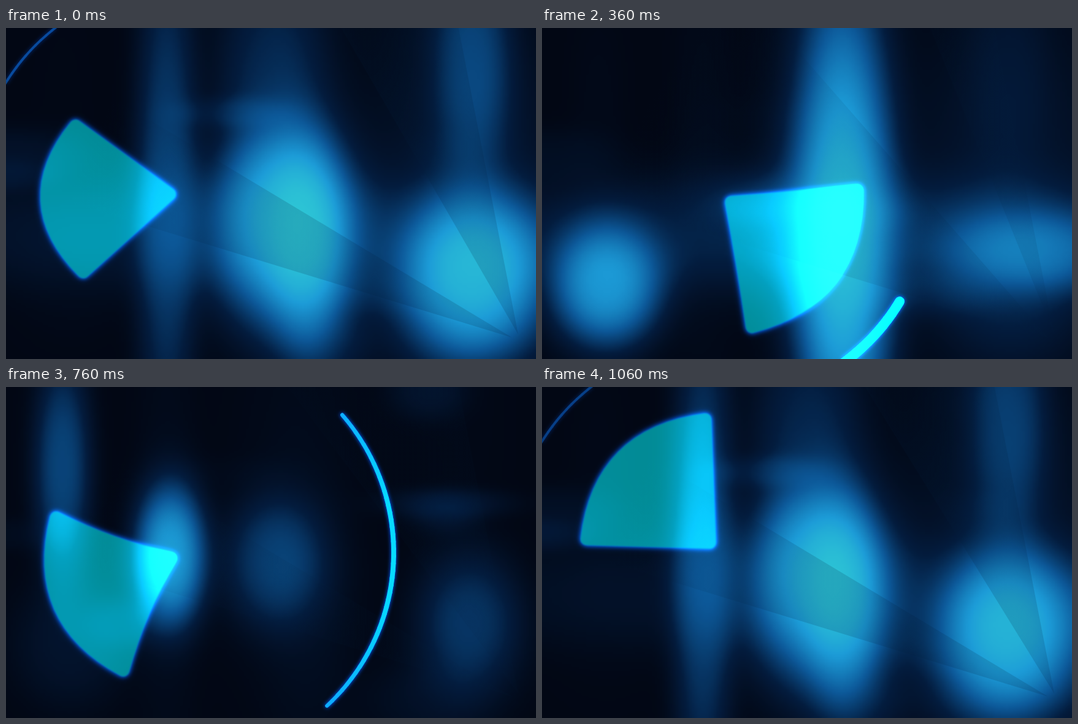
Animation of 864x540 px, one loop 1100 ms. Source, as an HTML page with a canvas:

```html
<!DOCTYPE html>
<html lang="en">
<head>
<meta charset="utf-8">
<title>Glow loop</title>
<style>
html, body { margin: 0; width: 100%; height: 100%; overflow: hidden; background: #02030c; }
canvas { display: block; width: 864px; height: 540px; }
</style>
</head>
<body>
<canvas id="stage" width="864" height="540"></canvas>
<script>
const W = 864, H = 540, CELL = 4, LOOP = 1100, HOLD = 100, BEAT = 500;
const CX = 290, CY = 270, RAD = Math.PI / 180;
const COLS = W / CELL, ROWS = H / CELL;

function makeCanvas(w, h) {
  const c = document.createElement('canvas');
  c.width = w;
  c.height = h;
  return c.getContext('2d');
}
const ctx = document.getElementById('stage').getContext('2d');
const pen = makeCanvas(W, H);
const haze = makeCanvas(COLS, ROWS);
const pixels = haze.createImageData(COLS, ROWS);
const field = new Float32Array(COLS * ROWS);

const clamp = (v, lo = 0, hi = 1) => Math.max(lo, Math.min(hi, v));

// Bell-shaped swell around a moment of the two-beat cycle
function pulse(time, peak, spread = 200) {
  const cycle = 2 * BEAT;
  const away = Math.abs(time - peak) % cycle;
  return Math.exp(-((Math.min(away, cycle - away) / spread) ** 2));
}

// Light level to colour: black, navy, blue, azure, aqua
const ramp = ['2,3,12', '3,28,62', '12,88,152', '28,155,215', '52,215,212'].map(c => c.split(',').map(Number));
const palette = Array.from({ length: 256 }, (_, i) => {
  const p = i / 256 * 4, n = Math.floor(p);
  return ramp[n].map((v, c) => v + (ramp[n + 1][c] - v) * (p - n));
});

const lamps = [];
function lamp(x, y, rx, ry, level, peak) {
  const shape = field.map((_, i) => {
    const dx = ((i % COLS + 0.5) * CELL - x) / rx;
    const dy = ((Math.floor(i / COLS) + 0.5) * CELL - y) / ry;
    return Math.exp(-((dx * dx + dy * dy) ** 1.4));
  });
  lamps.push({ shape, level, peak });
}

// Middle
lamp(455, 335, 125, 170, 0.72, 30);
lamp(490, 345, 62, 160, 0.6, 30);
lamp(490, 330, 85, 420, 0.85, 310);
lamp(440, 285, 85, 110, 0.6, 820);
lamp(430, 90, 90, 200, 0.25, 0);
// Left
lamp(105, 420, 95, 105, 0.97, 380);
lamp(92, 130, 48, 180, 0.42, 610);
lamp(268, 275, 60, 120, 0.75, 680);
lamp(262, 270, 52, 420, 0.36, 960);
// Right
lamp(765, 410, 130, 140, 0.75, 30);
lamp(755, 385, 85, 115, 0.6, 830);
lamp(760, 60, 65, 200, 0.35, 30);
lamp(800, 365, 150, 65, 0.4, 230);
// Wide haze
lamp(430, 335, 700, 95, 0.28, 160);
lamp(760, 250, 180, 300, 0.2, 130);

let seed = 11;
function random() {
  seed = seed * 16807 % 2147483647;
  return seed / 2147483647;
}
for (let i = 0; i < 12; i++) {
  lamp(random() * W, random() * H, 50 + 70 * random(), 25 + 40 * random(), 0.13, 1000 * random());
}

function drawHaze(time) {
  field.fill(0.96);
  for (const { shape, level, peak } of lamps) {
    const power = level * pulse(time, peak);
    if (power < 0.004) continue;
    for (let i = 0; i < field.length; i++) field[i] *= 1 - power * shape[i];
  }
  field.forEach((dark, i) => {
    const [r, g, b] = palette[Math.floor(clamp(1 - dark, 0, 0.999) * 256)];
    pixels.data.set([r, g, b, 255], i * 4);
  });
  haze.putImageData(pixels, 0, 0);
  ctx.imageSmoothingQuality = 'high';
  ctx.drawImage(haze.canvas, 0, 0, W, H);
}

// Shaded fan that fades away from its apex
function beam(x, y, from, to, strength) {
  const reach = 760;
  const fill = ctx.createRadialGradient(x, y, 0, x, y, reach);
  fill.addColorStop(0, `rgba(0,30,60,${strength})`);
  fill.addColorStop(0.6, `rgba(0,30,60,${strength})`);
  fill.addColorStop(1, 'rgba(0,30,60,0)');
  ctx.fillStyle = fill;
  ctx.beginPath();
  ctx.moveTo(x, y);
  ctx.arc(x, y, reach, from * RAD, to * RAD);
  ctx.fill();
}

function drawBeams(time) {
  const turn = Math.PI * time / BEAT;
  const sway = Math.sin(turn);
  const strength = 0.04 + 0.06 * (1 + Math.cos(turn));
  beam(825, 505, 197, 211 + 18 * Math.max(0, sway), strength);
  beam(835, 500, 240 + 8 * sway, 259, strength);
}

// Adds the drawing layer to the stage as light
function addLayer(filter, alpha) {
  ctx.save();
  ctx.globalCompositeOperation = 'lighter';
  ctx.globalAlpha = alpha;
  ctx.filter = filter;
  ctx.drawImage(pen.canvas, 0, 0);
  ctx.restore();
  pen.clearRect(0, 0, W, H);
}

function drawWedge(time) {
  const u = time % BEAT / BEAT;
  const first = time < BEAT;
  const kick = Math.exp(-7 * u);
  const angle = first ? 403 - 226 * kick : 225 - 182 * (1 - u) ** 2.4;
  const squeeze = first ? kick : 0;
  const swell = 9 * pulse(time, 200);
  const bend = 18 * pulse(time, 560);
  const half = (39 - 4 * squeeze) * RAD;
  const r = 216 - 11 * squeeze + swell, bulge = 221 + swell, tip = 23;
  const x = r * Math.cos(half), y = r * Math.sin(half);
  const mx = (x + tip) / 2 + bend * 0.6, my = y / 2 - bend * 0.8;
  pen.save();
  pen.translate(CX, CY);
  pen.rotate(angle * RAD);
  pen.beginPath();
  pen.moveTo(tip, 0);
  pen.quadraticCurveTo(mx, -my, x, -y);
  pen.quadraticCurveTo(2 * bulge - x, 0, x, y);
  pen.quadraticCurveTo(mx, my, tip, 0);
  pen.closePath();
  pen.fillStyle = pen.strokeStyle = 'rgb(0,132,130)';
  pen.lineWidth = 20;
  pen.lineJoin = 'round';
  pen.fill();
  pen.stroke();
  pen.restore();
  addLayer('blur(1px) drop-shadow(0 0 3px rgb(0,95,240)) drop-shadow(0 0 5px rgba(0,80,210,.6))', 1);
}

function drawArc(time) {
  const span = 88, parts = 44;
  const start = 199 + 360 * time / BEAT;
  const loud = pulse(time, 230), echo = pulse(time, 720);
  pen.lineCap = 'round';
  for (let i = 0; i < parts; i++) {
    const a = start + span * i / parts;
    const place = (a + 180) % 360 - 180;
    const face = Math.max(0, Math.cos(place * RAD));
    const w = 4 + 12 * loud * clamp((place + 60) / 90) * Math.ceil(face) + 4 * echo * face ** 2;
    const hot = clamp((w - 5) / 4);
    pen.strokeStyle = `rgb(${15 - 15 * hot},${135 + 110 * hot},255)`;
    pen.lineWidth = w;
    pen.beginPath();
    pen.arc(CX, CY, 342, a * RAD, (a + span / parts) * RAD);
    pen.stroke();
  }
  const level = clamp(0.7 + 0.6 * Math.cos((start + span / 2) * RAD), 0.35, 1);
  addLayer('drop-shadow(0 0 3px rgb(0,90,255))', level);
}

function render(time) {
  drawHaze(time);
  drawBeams(time);
  drawWedge(time);
  drawArc(time);
}

// Thirty steps a second, with a hold at the start of the loop
function stepTime(ms) {
  const tens = Math.floor(ms / 10) * 10;
  const step = Math.ceil((tens + 10) * 3 / 100) - 1;
  return Math.max(0, step * 100 / 3 - HOLD);
}

const begin = performance.now();
let shown = -1;
function tick() {
  const time = stepTime((performance.now() - begin) % LOOP);
  if (time !== shown) render(shown = time);
  requestAnimationFrame(tick);
}
tick();
</script>
</body>
</html>
```
